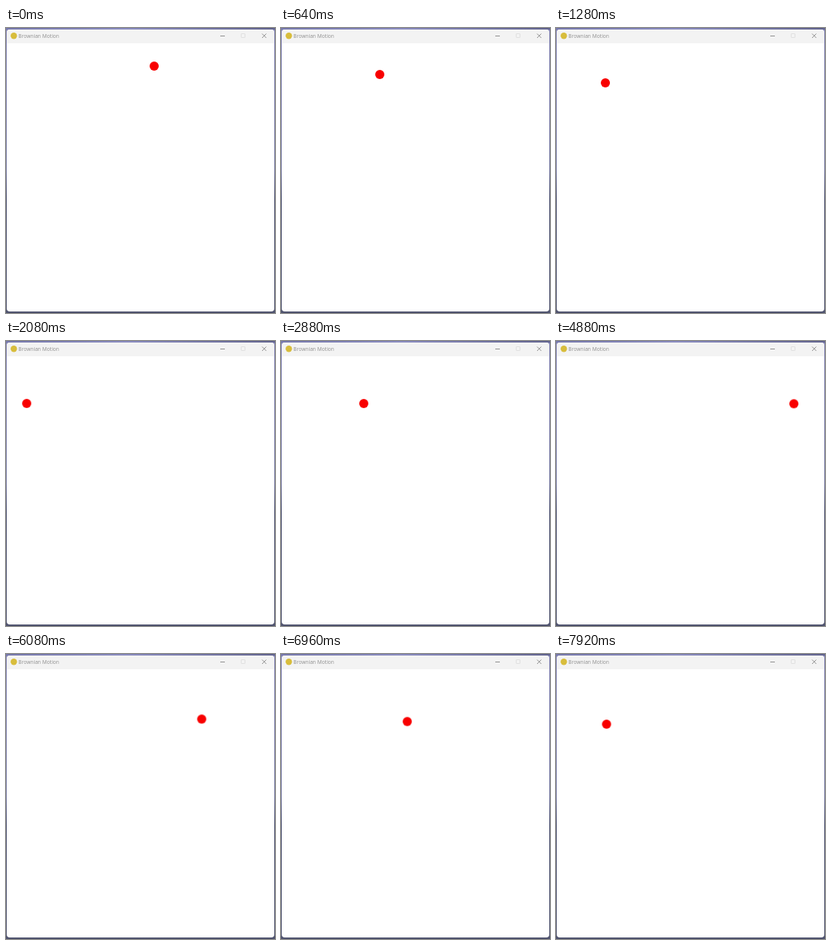
Recreate the animation shown at these times as an HTML page. Size 354x374 px, loop 8000 ms.

```html
<!DOCTYPE html>
<html lang="en">
<head>
<meta charset="utf-8">
<title>Brownian Motion</title>
<style>
  html, body { margin: 0; width: 100%; height: 100%; overflow: hidden; }
  svg { display: block; width: 354px; height: 374px; }
  .title { font: 6.7px "Open Sans", "Noto Sans", sans-serif; fill: #8f8f8f; }
  .ball { fill: #f80000; animation: drift 8s infinite; }

  /* 1% is one 80 ms tick; each straight leg runs in whole ticks */
  @keyframes drift {
    0%   { transform: translate(195px, 50px); animation-timing-function: steps(23); }
    23%  { transform: translate(8.1px, 81.6px); animation-timing-function: steps(1); }
    24%  { transform: translate(10.9px, 81.9px); animation-timing-function: steps(41); }
    65%  { transform: translate(345.7px, 82.4px); animation-timing-function: steps(1); }
    66%  { transform: translate(340.6px, 82.5px); animation-timing-function: steps(34); }
    100% { transform: translate(58.2px, 92.4px); }
  }
</style>
</head>
<body>
<svg viewBox="0 0 354 374">
  <defs>
    <linearGradient id="desk" x2="0" y2="1">
      <stop offset="0" stop-color="#8182b4"/>
      <stop offset=".5" stop-color="#777aa3"/>
      <stop offset=".6" stop-color="#4a4f70"/>
      <stop offset="1" stop-color="#50546f"/>
    </linearGradient>
    <linearGradient id="sky">
      <stop offset="0" stop-color="#7779ad"/>
      <stop offset=".45" stop-color="#8a8cc0"/>
      <stop offset="1" stop-color="#62648f"/>
    </linearGradient>
    <clipPath id="win"><rect x="1" y="2" width="352" height="370" rx="4"/></clipPath>
  </defs>
  <rect width="354" height="374" fill="url(#desk)"/>
  <rect width="354" height="2" fill="url(#sky)"/>
  <g clip-path="url(#win)">
    <rect width="354" height="374" fill="#fff"/>
    <rect width="354" height="20" fill="#f3f3f3"/>
    <circle class="ball" r="6"/>
  </g>
  <circle cx="10.3" cy="10.3" r="4.2" fill="#d8bd3c"/>
  <text class="title" x="16.3" y="13">Brownian Motion</text>
  <g fill="none" stroke="#858585" stroke-width=".9">
    <path d="M282 10.5h6"/>
    <rect x="309.5" y="7.5" width="5" height="5" rx=".5" stroke="#dedede"/>
    <path d="M337 7.5l5.5 5.5m0-5.5l-5.5 5.5"/>
  </g>
</svg>
</body>
</html>
```
